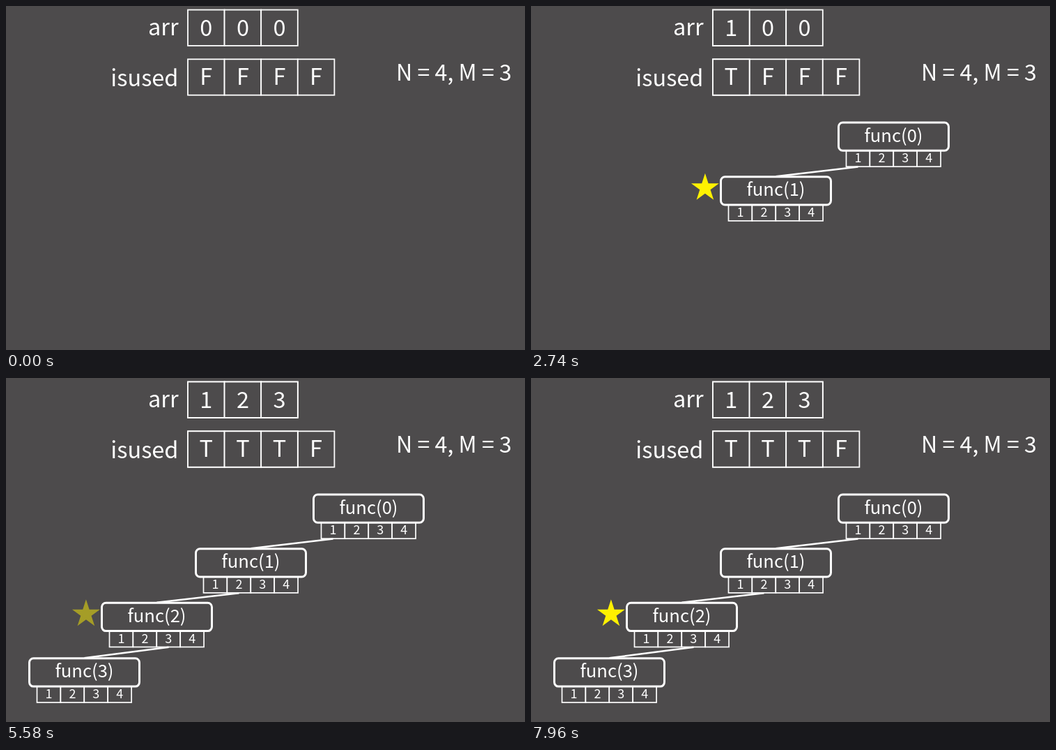
Animation, 745 px wide and 493 px high, one loop 8000 ms. Source, as an HTML page:

```html
<!DOCTYPE html>
<html lang="en">
<head>
<meta charset="utf-8">
<title>Permutation search</title>
<style>
  html, body { margin: 0; width: 100%; height: 100%; overflow: hidden; background: #4d4b4c; }
  svg { display: block; width: 745px; height: 493px; }
  text {
    fill: #fff; font-weight: 500;
    font-family: "Noto Sans CJK KR", "Noto Sans CJK JP", "Noto Sans CJK SC", "Noto Sans CJK", sans-serif;
  }
  .mid { text-anchor: middle; }
  .end { text-anchor: end; }
</style>
</head>
<body>
<svg id="stage" viewBox="0 0 745 493"></svg>
<script>
const NS = "http://www.w3.org/2000/svg";
const BG = "#4d4b4c", LOOP = 8000;
const stage = document.getElementById("stage");
const fades = [];

function add(parent, tag, attrs, text) {
  const el = document.createElementNS(NS, tag);
  for (const k in attrs) el.setAttribute(k, attrs[k]);
  if (text !== undefined) el.textContent = text;
  parent.appendChild(el);
  return el;
}

function label(parent, x, y, size, text, cls) {
  add(parent, "text", { x, y, "font-size": size, class: cls }, text);
}

function box(parent, x, y, w, h, stroke, extra) {
  add(parent, "rect", { x, y, width: w, height: h, fill: BG, stroke: "#fff", "stroke-width": stroke, ...extra });
}

// A group whose opacity ramps in at [from, length] and out again at the optional second pair.
function fading(show, hide) {
  const el = add(stage, "g", {});
  fades.push({ el, show, hide });
  return el;
}

const ramp = (t, [from, length]) => Math.min(1, Math.max(0, (t - from) / length));

// Array cells
const SIDE = 52.6;
const rows = { arr: { y: 5.5, base: 42.6 }, used: { y: 76.3, base: 112.6 } };
function cell(parent, row, i, text) {
  const x = 261 + i * SIDE;
  box(parent, x, rows[row].y, SIDE, 51.4, 1.8);
  label(parent, x + SIDE / 2, rows[row].base, 32.5, text, "mid");
}

label(stage, 247.5, 42, 32.5, "arr", "end");
label(stage, 247.5, 115, 32.5, "isused", "end");
label(stage, 560, 107, 32.2, "N = 4, M = 3", "start");
for (let i = 0; i < 3; i++) cell(stage, "arr", i, "0");
for (let i = 0; i < 4; i++) cell(stage, "used", i, "F");

const writes = [[1130, 1570], [3510, 3510], [5130, 5130]];
writes.forEach(([arrAt, usedAt], i) => {
  cell(fading([arrAt, 160]), "arr", i, i + 1);
  cell(fading([usedAt, 160]), "used", i, "T");
});

// Call tree
const nodes = [
  { x: 441.5, y: 167, at: 10 },
  { x: 272.5, y: 244.7, at: 1930 },
  { x: 137.5, y: 322.3, at: 3510 },
  { x: 33.5, y: 401.8, at: 5130 }
];

nodes.forEach(({ x, y, at }, depth) => {
  const g = fading([at, depth ? 170 : 200]);
  if (depth) {
    const up = nodes[depth - 1];
    add(g, "line", {
      x1: up.x + 28 + 34 * (depth - 1), y1: up.y + 63.5, x2: x + 79, y2: y - 0.5,
      stroke: "#fff", "stroke-width": 2.5
    });
  }
  for (let i = 0; i < 4; i++) {
    box(g, x + 11 + i * 33.9, y + 40, 33.9, 23.2, 1.7);
    label(g, x + 28 + i * 33.9, y + 57.2, 18, i + 1, "mid");
  }
  box(g, x, y, 158, 40.3, 3, { rx: 6 });
  label(g, x + 79, y + 27.6, 25.6, `func(${depth})`, "mid");
});

// Star marking the active call
function star(depth, show, hide) {
  const { x, y } = nodes[depth];
  const cx = x - 22.6, cy = y + 16;
  const points = Array.from({ length: 10 }, (_, i) => {
    const r = i % 2 ? 8 : 21, a = (i * 36 - 90) * Math.PI / 180;
    return (cx + r * Math.cos(a)).toFixed(2) + "," + (cy + r * Math.sin(a)).toFixed(2);
  });
  add(fading(show, hide), "polygon", { points: points.join(" "), fill: "#fff100" });
}

const FADE = 200;
const moves = [[0, 10], [1, 2540], [2, 4120], [3, 5740], [2, 6940]];
moves.forEach(([depth, at], i) => {
  const next = moves[i + 1];
  star(depth, [at, FADE], next && [next[1] - 260, FADE]);
});

function draw(t) {
  for (const { el, show, hide } of fades) {
    const a = ramp(t, show) * (hide ? 1 - ramp(t, hide) : 1);
    el.setAttribute("opacity", t < 20 ? 0 : a.toFixed(3));
  }
}

const start = performance.now();
function tick() {
  draw((performance.now() - start) % LOOP);
  requestAnimationFrame(tick);
}
draw(0);
requestAnimationFrame(tick);
</script>
</body>
</html>
```
